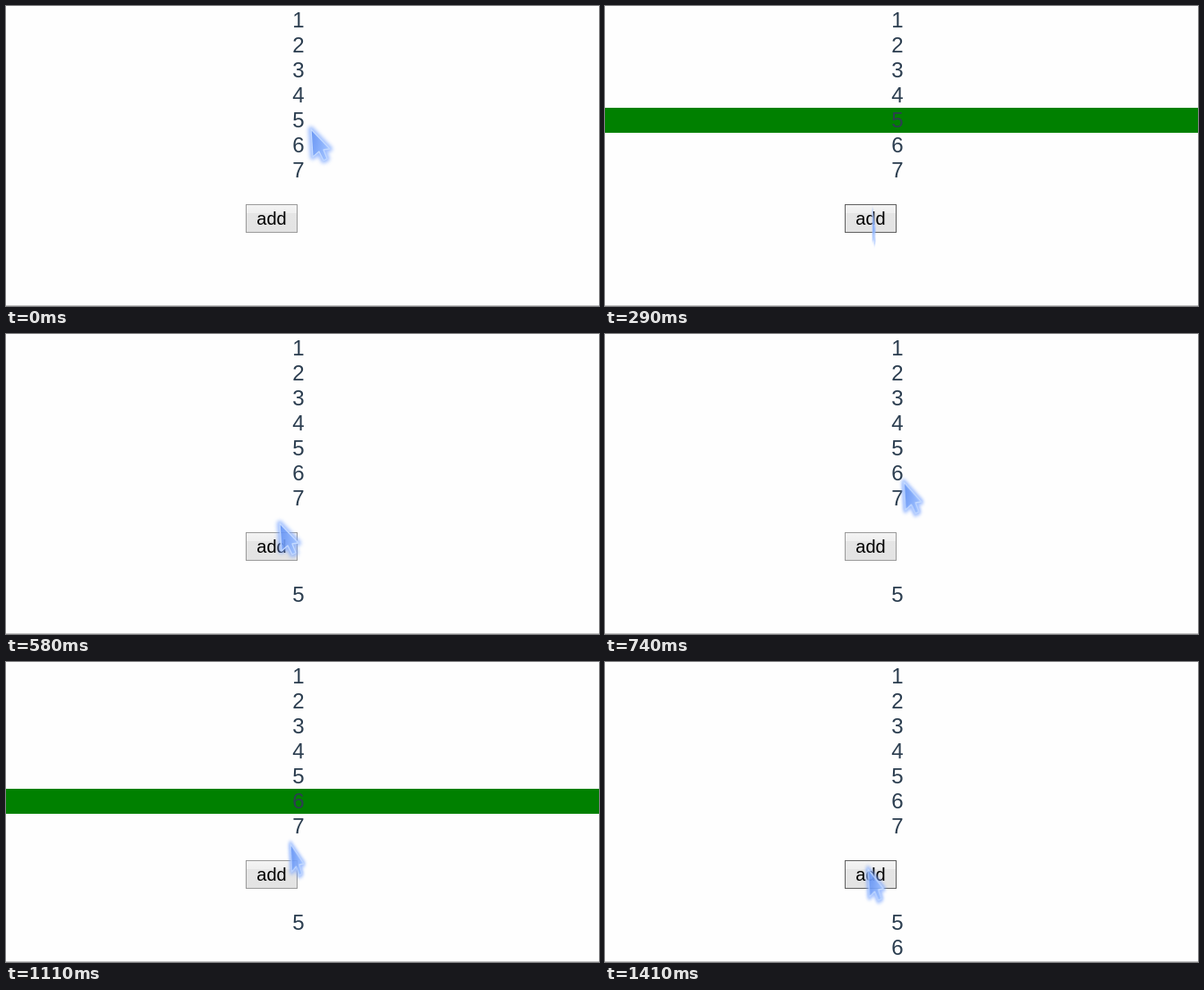
These frames come from a looping animation (663 px wide and 336 px high, 1490 ms). An HTML page:

```html
<!DOCTYPE html>
<html lang="en">
<head>
<meta charset="utf-8">
<title>Add to list</title>
<style>
  html, body { margin: 0; width: 100%; height: 100%; overflow: hidden; background: #fefefe; }
  svg { display: block; width: 663px; height: 336px; }
  text { font-family: "Liberation Sans", Arial, sans-serif; text-anchor: middle; }
  .num { font-size: 24px; fill: #2c3e50; }
  .label { font-size: 20px; fill: #000; }

  .pick5, .pick6, .add5, .add6, .hover, .press, .cursor {
    animation: 1490ms step-end infinite;
  }
  .pick5 { animation-name: pick5; }
  .pick6 { animation-name: pick6; }
  .add5 { animation-name: add5; }
  .add6 { animation-name: add6; }
  .hover { animation-name: hover; }
  .press { animation-name: press; }
  .cursor { animation-name: cursor; }

  @keyframes pick5 { 0%, 33.55% { opacity: 0 } 4.02% { opacity: 1 } }
  @keyframes pick6 { 0%, 94.63% { opacity: 0 } 65.1% { opacity: 1 } }
  @keyframes add5 { 0% { opacity: 0 } 33.55%, 100% { opacity: 1 } }
  @keyframes add6 { 0% { opacity: 0 } 94.63%, 100% { opacity: 1 } }
  @keyframes hover {
    0%, 29.53%, 38.92%, 89.93% { opacity: 0 }
    19.46%, 33.55%, 79.19%, 94.63%, 100% { opacity: 1 }
  }
  @keyframes press {
    0%, 33.55%, 94.63%, 100% { opacity: 0 }
    29.53%, 89.93% { opacity: 1 }
  }

  /* The pointer turns about its tip while it travels. */
  @keyframes cursor {
    0%     { transform: translate(341px, 138px) }
    4.02%  { transform: translate(328px, 168px) scaleX(.97) }
    9.39%  { transform: translate(310px, 205px) scaleX(.93) }
    14.76% { transform: translate(302px, 221px) scaleX(.6) }
    19.46% { transform: translate(299px, 230px) scaleX(.15) }
    24.16% { transform: translate(299px, 232px) scaleX(.5) }
    29.53% { transform: translate(299px, 232px) scaleX(.85) }
    33.55% { transform: translate(300px, 229px) scaleX(.95) }
    38.92% { transform: translate(306px, 212px) }
    44.29% { transform: translate(320px, 187px) scaleX(.98) }
    49.66% { transform: translate(334px, 166px) scaleX(.93) }
    65.1%  { transform: translate(333px, 161px) scale(.1, .75) }
    69.12% { transform: translate(329px, 180px) scaleX(.4) }
    74.49% { transform: translate(318px, 204px) scaleX(.7) }
    79.19% { transform: translate(304px, 228px) scaleX(.9) }
    84.56% { transform: translate(292px, 247px) }
    89.93% { transform: translate(288px, 253px) }
    94.63% { transform: translate(294px, 232px) scaleX(.83) }
  }
</style>
</head>
<body>
<svg viewBox="0 0 663 336">
  <defs>
    <linearGradient id="face" x2="0" y2="1">
      <stop stop-color="#f4f4f4"/>
      <stop offset=".3" stop-color="#efefef"/>
      <stop offset=".31" stop-color="#e5e5e5"/>
      <stop offset="1" stop-color="#e3e3e3"/>
    </linearGradient>
    <linearGradient id="pressed" x2="0" y2="1">
      <stop stop-color="#dcdcdc"/>
      <stop offset=".4" stop-color="#e2e2e2"/>
      <stop offset="1" stop-color="#f3f3f3"/>
    </linearGradient>
    <linearGradient id="blue" x2="1" y2=".3">
      <stop stop-color="#4f83ee"/>
      <stop offset="1" stop-color="#9fc2ff"/>
    </linearGradient>
    <filter id="glow" x="-60%" y="-60%" width="220%" height="220%">
      <feGaussianBlur stdDeviation="2"/>
    </filter>
    <path id="arrow" d="M0 0L2 31L9 25L14 35L18 33L14 23L21 22Z"/>
  </defs>

  <rect y="335" width="663" height="1" fill="#c4c4c4"/>
  <rect class="pick5" y="114" width="663" height="28" fill="#008000"/>
  <rect class="pick6" y="142" width="663" height="28" fill="#008000"/>

  <g class="num">
    <text x="327" y="24">1</text>
    <text x="327" y="52">2</text>
    <text x="327" y="80">3</text>
    <text x="327" y="108">4</text>
    <text x="327" y="136">5</text>
    <text x="327" y="164">6</text>
    <text x="327" y="192">7</text>
    <text class="add5" x="327" y="300">5</text>
    <text class="add6" x="327" y="328">6</text>
  </g>

  <g stroke="#9a9a9a">
    <rect x="268.5" y="222.5" width="57" height="31" fill="url(#face)"/>
    <rect class="press" x="268.5" y="222.5" width="57" height="31" fill="url(#pressed)"/>
    <rect class="hover" x="268.5" y="222.5" width="57" height="31" fill="none" stroke="#606060"/>
  </g>
  <text class="label" x="297" y="245">add</text>

  <g class="cursor" stroke-linejoin="round">
    <use href="#arrow" fill="#6f9dff" stroke="#7ba6ff" stroke-width="6" opacity=".75" filter="url(#glow)"/>
    <use href="#arrow" fill="url(#blue)" fill-opacity=".65" stroke="#c4dafF" stroke-width="1.3"/>
  </g>
</svg>
</body>
</html>
```
